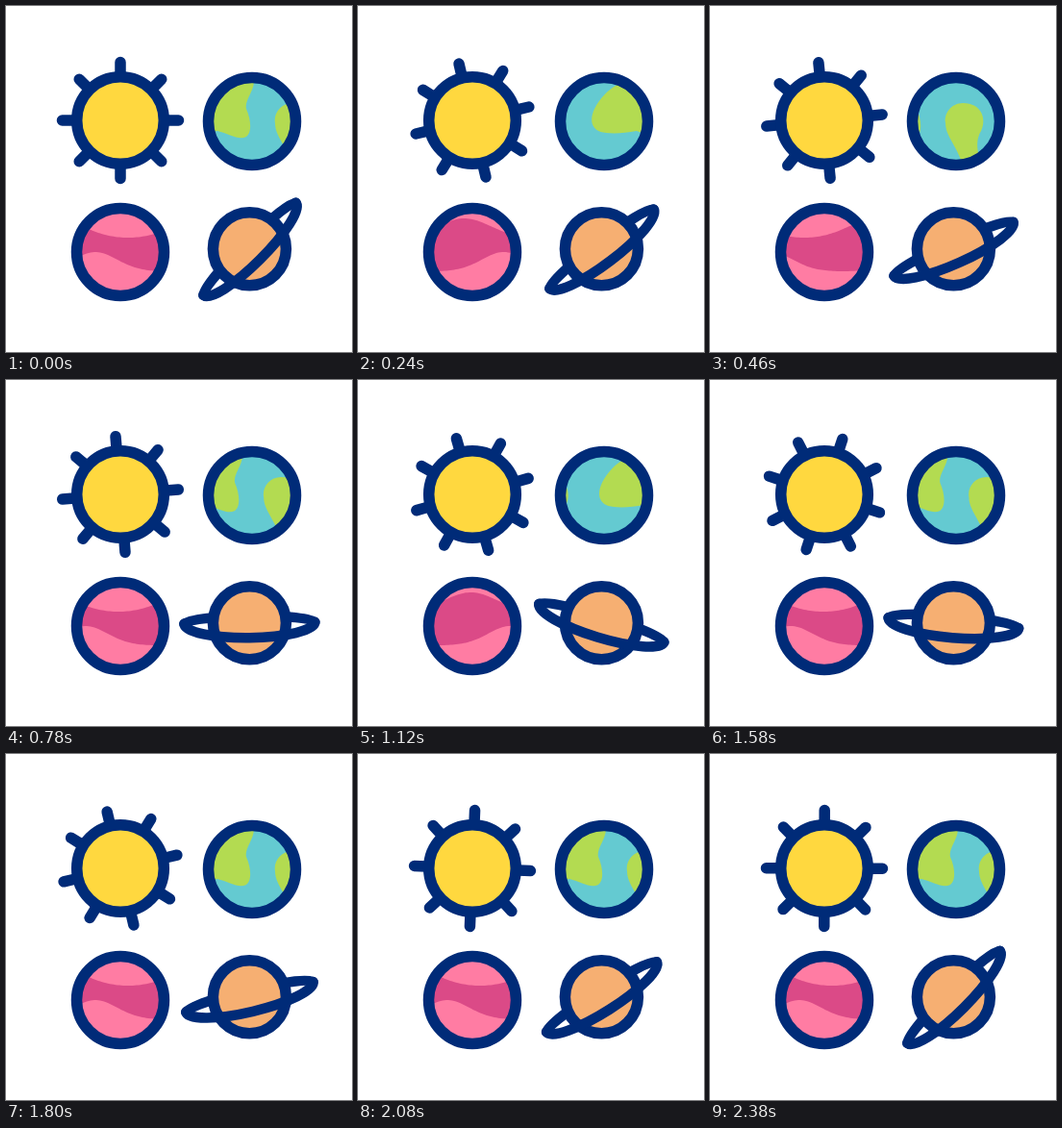
Write an HTML page that moves like this. It is 360x360 px and loops after 2.4 s.

```html
<!DOCTYPE html>
<html lang="en">
<head>
<meta charset="utf-8">
<title>Planets</title>
<style>
  html, body { margin: 0; height: 100%; overflow: hidden; background: #fff; }
  svg { display: block; width: 100%; height: 100%; }
  .line { fill: none; stroke: #002b78; stroke-width: 11.5; stroke-linecap: round; }
  .ring { stroke-width: 10.5; }
</style>
</head>
<body>
<svg viewBox="0 0 360 360">
  <defs>
    <clipPath id="earthClip"><circle cx="256" cy="120" r="43"/></clipPath>
    <clipPath id="pinkClip"><circle cx="119" cy="256" r="43"/></clipPath>
    <g id="land" fill="#b3db51">
      <path d="M200 82C212 74 242 70 258 79C257 90 248 99 250 107C255 118 256 132 250 136C242 140 232 133 220 130C206 133 190 133 183 131C173 127 171 118 177 106C183 95 190 88 200 82Z"/>
      <path d="M298 101C286 101 278 112 280 122C280 134 289 142 296 160L316 160C312 148 312 138 317 130C323 118 318 101 298 101Z"/>
    </g>
  </defs>

  <g transform="translate(119 119)">
    <path id="rays" class="line"/>
    <circle class="line" r="45.3" style="fill:#ffd83f"/>
  </g>

  <g clip-path="url(#earthClip)">
    <path fill="#64cad1" d="M206 70h100v100h-100z"/>
    <g id="lands"><use href="#land"/><use href="#land" x="-178"/></g>
  </g>
  <circle class="line" cx="256" cy="120" r="45.5"/>

  <g clip-path="url(#pinkClip)">
    <path fill="#ff7ca3" d="M69 206h100v100h-100z"/>
    <path id="band" fill="#db4a87"/>
  </g>
  <circle class="line" cx="119" cy="256" r="45.5"/>

  <g transform="translate(253.4 252.7)">
    <path id="ringBack" class="line ring" d="M-68 0A68 7 0 0 1 68 0"/>
    <circle class="line" r="38" style="fill:#f6af72"/>
    <path id="ringFront" class="line ring" d="M-68 0A68 15.5 0 0 0 68 0"/>
  </g>
</svg>
<script>
const LOOP = 2400, LAND_WIDTH = 178, WAVE_WIDTH = 150;
const el = id => document.getElementById(id);

// Smooth interpolation through [time, value] keys without overshoot.
function track(keys) {
  const slope = i => (keys[i + 1][1] - keys[i][1]) / (keys[i + 1][0] - keys[i][0]);
  const tangents = keys.map((_, i) => {
    if (i === 0 || i === keys.length - 1) return 0;
    const a = slope(i - 1), b = slope(i);
    return a * b > 0 ? 2 * a * b / (a + b) : 0;
  });
  return t => {
    let i = 0;
    while (i < keys.length - 2 && t >= keys[i + 1][0]) i++;
    const [t0, v0] = keys[i], [t1, v1] = keys[i + 1];
    const d = t1 - t0, s = (t - t0) / d, r = 1 - s;
    return v0 * r * r * (1 + 2 * s) + v1 * s * s * (3 - 2 * s)
      + d * s * r * (tangents[i] * r - tangents[i + 1] * s);
  };
}

const sunAngle = track([[0, 0], [460, 84], [780, 175], [1120, 254], [1220, 256], [1380, 249.5], [1800, 122], [LOOP, 0]]);
const ringAngle = track([[0, -45], [460, -24.3], [780, -0.8], [1120, 17], [1220, 17.4], [1380, 16.2], [1800, -13.3], [LOOP, -45]]);
const spin = track([[0, 0], [460, .803], [780, .933], [900, 1], [1120, 1.433], [1380, 1.82], [1800, 2], [LOOP, 2]]);

el('rays').setAttribute('d', Array.from({ length: 8 }, (_, i) => {
  const x = Math.cos(i * Math.PI / 4), y = Math.sin(i * Math.PI / 4);
  return `M${x * 48} ${y * 48}L${x * 60.5} ${y * 60.5}`;
}).join(''));

// The trough lies at x = low; flatness broadens it.
function wave(x, mid, low, flatness) {
  const phase = 2 * Math.PI * (x - low) / WAVE_WIDTH;
  return mid + 10 * Math.cos(phase - flatness * Math.sin(phase));
}

function bandPath(shift) {
  const top = [], bottom = [];
  for (let x = 70; x <= 168; x += 2) {
    top.push(x + ' ' + wave(x - shift, 231, 127, .25));
    bottom.unshift(x + ' ' + wave(x - shift, 266, 168, .5));
  }
  return 'M' + top.concat(bottom).join('L') + 'Z';
}

function draw(now) {
  const t = now % LOOP, turn = spin(t) % 1;
  const rotate = (id, angle) => el(id).setAttribute('transform', `rotate(${angle})`);
  rotate('rays', sunAngle(t));
  rotate('ringBack', ringAngle(t));
  rotate('ringFront', ringAngle(t));
  el('lands').setAttribute('transform', `translate(${turn * LAND_WIDTH})`);
  el('band').setAttribute('d', bandPath(turn * WAVE_WIDTH));
}

const start = performance.now();
function frame() {
  draw(performance.now() - start);
  requestAnimationFrame(frame);
}
frame();
</script>
</body>
</html>
```
